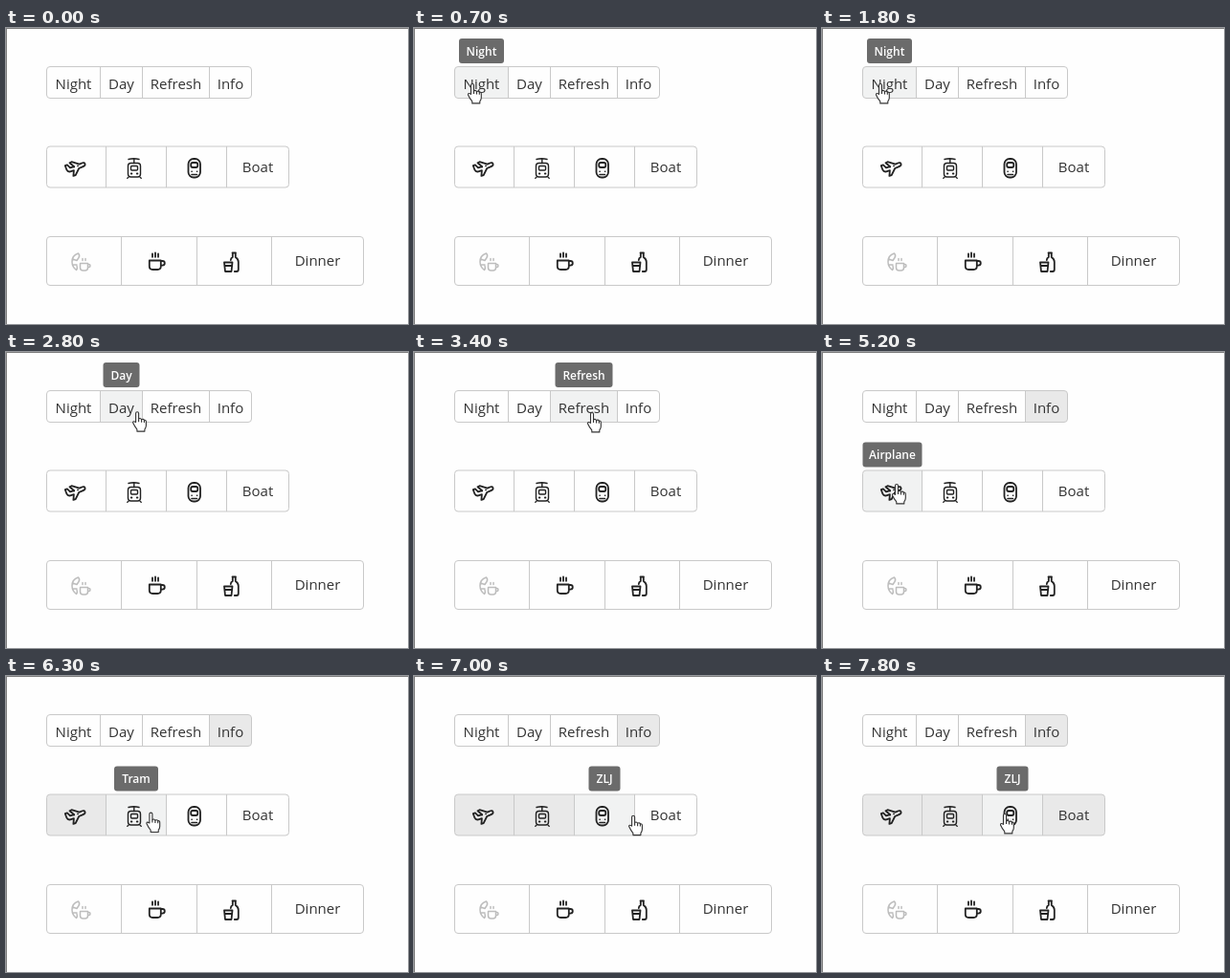
Animation, 420 px wide and 310 px high, one loop 8 s. Source, as an HTML page:

```html
<!DOCTYPE html>
<html lang="en">
<head>
<meta charset="utf-8">
<title>Button groups</title>
<style>
  html, body { margin: 0; width: 100%; height: 100%; overflow: hidden; background: #fefefe; }
  svg { display: block; }
  text { font: 15px "Open Sans", "Noto Sans", sans-serif; fill: #333; text-anchor: middle; }
  .tip rect { fill: #6b6b6b; }
  .tip text { font-size: 12px; font-weight: 600; fill: #fff; }
  .lines { fill: none; stroke: #c9c9c9; }
  .icon { fill: none; stroke: #222; stroke-width: 1.8; stroke-linecap: round; stroke-linejoin: round; }
  .thin { stroke-width: 1.4; }
  .off { stroke: #bdbdbd; stroke-width: 1.5; }
  .cursor { fill: #fff; stroke: #333; stroke-width: 1.1; stroke-linejoin: round; }
</style>
</head>
<body>
<svg id="stage" width="420" height="310" viewBox="0 0 420 310">
  <path d="M0 .5H420M.5 0V310" stroke="#808080" fill="none"/>
  <g id="groups"></g>

  <g class="icon">
    <path d="M61.8 144.2l2.2-.8 3 3 4.2-1.2-4.7-4 2-1 8.200 2.400 2.500-1.100q2.700-1 3.300.7t-2 2.900l-4.300 1.900-3.500 7.200-2.300.7.5-5.800-3.700 1.300q-2.700.5-3.700-1.700z"/>
    <path d="M71 145.600h.1M75 144.300h.1"/>
  </g>
  <g class="icon thin">
    <rect x="127.500" y="141.500" width="13" height="14.500" rx="3"/>
    <path d="M128 137.500q5.500-1.500 11 0M133.800 137v4.500M127.800 156.500l-1 .8M140.200 156.500l1 .8"/>
    <rect x="130.500" y="144.500" width="7" height="4.500" rx="1"/>
    <path d="M130.800 152.500h.6M136.800 152.500h.6" stroke-width="1.900"/>
  </g>
  <g class="icon">
    <rect x="190.500" y="137" width="12.500" height="19.500" rx="5.500"/>
    <rect x="193.200" y="141" width="7.100" height="5" rx="2"/>
    <path d="M194 150.200h.2M199.500 150.200h.2M194 153.500h5.500" stroke-width="1.600"/>
  </g>
  <g class="icon off">
    <path d="M75.500 236q-6.500 2-6.500 9 0 5 4.500 8.500 1.500-2 .5-4.500M75.500 236q2 2 .5 4.500l-2 3M69.500 242l4.500 1.500M69.500 248l4.500 0"/>
    <path d="M77.500 246.500h8v4.500q0 3-3 3h-2q-3 0-3-3zM85.500 247.500h1q1.500 0 1.500 1.500t-1.500 1.500h-1M80 241.500v2M83 241.500v2"/>
  </g>
  <g class="icon">
    <path d="M149.800 243.500h12v6q0 3.500-3.500 3.500h-5q-3.500 0-3.500-3.500zM161.800 244h1.500q2.500 0 2.500 2.300t-2.500 2.300h-1.500M153 236.500v3.300M156 235.500v4.300M159 236.500v3.300"/>
  </g>
  <g class="icon">
    <path d="M228 245.500h8.500l-1 9.500h-6.500zM229 249h6.500M236.500 235.500h3.500M236.800 236v4q-2 1-2 3M239.800 236v4q3 2 3 5v8q0 2-2 2h-2"/>
  </g>

  <g id="tips"></g>
  <g class="cursor" id="cursor">
    <g id="hand">
      <path d="M-1.500 10.400V1a1.500 1.500 0 0 1 3 0v6q1.500-1.500 3 .5 2-1 2.800.6 2-.4 2 1.800v4q0 2-1.500 4v2h-8v-2q-2.500-3-4.300-7 0-2.500 3-.5z"/>
      <path d="M1.500 7v3M4.500 7.500v3M7.300 8.100v2.600" fill="none"/>
    </g>
    <path id="arrow" d="M0 0v15l3.500-3.300 2.300 5.300 2.200-1-2.300-5.200h4.800z"/>
  </g>
</svg>
<script>
const LOOP = 8000, STEP = 100;
const $ = id => document.getElementById(id);

function add(parent, tag, attrs, label) {
  const el = document.createElementNS('http://www.w3.org/2000/svg', tag);
  for (const key in attrs) el.setAttribute(key, attrs[key]);
  if (label) el.textContent = label;
  return parent.appendChild(el);
}

// on/off: when a button is selected and deselected; tip: text and width
const groups = [
  { y: 40.5, h: 33, base: 63.5, edges: [42.5, 98.5, 142.5, 212.5, 256.5], buttons: [
    { label: 'Night', tip: ['Night', 47], on: 700, off: 2400 },
    { label: 'Day', tip: ['Day', 38], on: 2400, off: 3400 },
    { label: 'Refresh', tip: ['Refresh', 60], on: 3400, off: 4300 },
    { label: 'Info', on: 4300 }] },
  { y: 124, h: 43, base: 151, edges: [42.5, 104.5, 167.5, 230.5, 295.5], buttons: [
    { tip: ['Airplane', 62], on: 5200 },
    { tip: ['Tram', 46], on: 5900 },
    { tip: ['ZLJ', 33], on: 6600 },
    { label: 'Boat', on: 7200 }] },
  { y: 218.5, h: 51, base: 249, edges: [42.5, 120.5, 199.5, 277.5, 373.5], buttons: [
    {}, {}, {}, { label: 'Dinner' }] }
];

const buttons = [];
groups.forEach(({ y, h, base, edges, buttons: items }, n) => {
  const root = $('groups'), left = edges[0], width = edges[4] - left;
  const clip = add(root, 'clipPath', { id: 'clip' + n });
  add(clip, 'rect', { x: left, y, width, height: h, rx: 4 });
  const cells = add(root, 'g', { 'clip-path': `url(#clip${n})` });
  items.forEach((b, i) => {
    const x = edges[i], w = edges[i + 1] - x, mid = x + w / 2;
    b.rect = add(cells, 'rect', { x, y, width: w, height: h });
    b.contains = (px, py) => px >= x && px < x + w && py >= y && py < y + h;
    if (b.label) add(root, 'text', { x: mid, y: base }, b.label);
    if (b.tip) {
      const [text, tipWidth] = b.tip;
      b.tipEl = add($('tips'), 'g', { class: 'tip' });
      add(b.tipEl, 'rect', { x: mid - tipWidth / 2, y: y - 29.5, width: tipWidth, height: 26, rx: 3 });
      add(b.tipEl, 'text', { x: mid, y: y - 12 }, text);
    }
    buttons.push(b);
  });
  add(root, 'rect', { class: 'lines', x: left, y, width, height: h, rx: 3.5 });
  add(root, 'path', { class: 'lines', d: edges.slice(1, 4).map(x => `M${x} ${y}v${h}`).join('') });
});

// Pointer moves: start time, steps, destination
const origin = [3, 96];
const moves = [
  [300, 5, 61, 59], [1900, 3, 128, 63], [2800, 4, 186, 64], [3600, 5, 226, 66],
  [4800, 5, 78, 139], [5600, 4, 140, 143], [6300, 4, 213, 147], [7000, 3, 275, 146],
  [7600, 3, 191, 145]
];

function pointerAt(t) {
  let [x, y] = origin;
  for (const [start, steps, toX, toY] of moves) {
    if (t < start) break;
    const p = Math.min(1, (Math.floor((t - start) / STEP) + 1) / steps);
    const ease = p * p * (3 - 2 * p);
    x += (toX - x) * ease;
    y += (toY - y) * ease;
  }
  return [x, y];
}

const show = (el, visible) => { el.style.display = visible ? '' : 'none'; };

function render(t) {
  const [x, y] = pointerAt(t), visible = t >= moves[0][0];
  let over = false;
  for (const b of buttons) {
    const hover = visible && b.contains(x, y);
    const selected = t >= b.on && t < (b.off ?? LOOP);
    b.rect.setAttribute('fill', hover ? '#f1f2f2' : selected ? '#e9e9e9' : '#fefefe');
    if (b.tipEl) show(b.tipEl, hover);
    over ||= hover;
  }
  show($('cursor'), visible);
  show($('hand'), over);
  show($('arrow'), !over);
  $('cursor').setAttribute('transform', `translate(${x.toFixed(1)} ${y.toFixed(1)})`);
}

const began = performance.now();
function tick() {
  render((performance.now() - began) % LOOP);
  requestAnimationFrame(tick);
}
tick();
</script>
</body>
</html>
```
